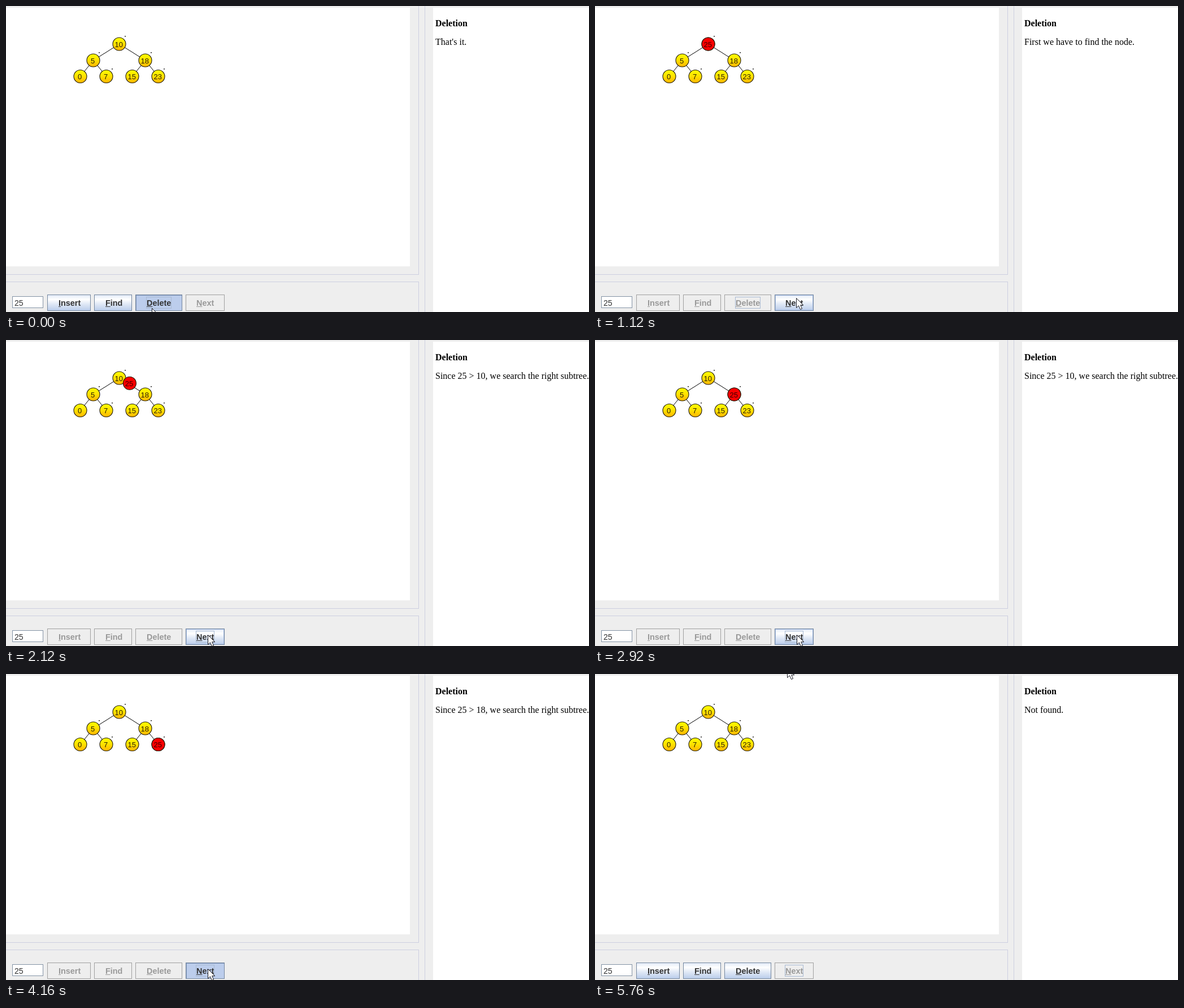
An HTML page with a canvas for the animation above (5.8 s loop, 1032 by 543 pixels).

```html
<!DOCTYPE html>
<html lang="en">
<head>
<meta charset="utf-8">
<title>Tree deletion</title>
<style>
html, body { margin: 0; width: 100%; height: 100%; overflow: hidden; background: #eee; }
canvas { display: block; }
</style>
</head>
<body>
<canvas id="stage" width="1032" height="543"></canvas>
<script>
const ctx = document.getElementById('stage').getContext('2d');
const LOOP = 5800, TICK = 40;
const SANS = '"Liberation Sans", Arial, sans-serif';
const SERIF = '"Liberation Serif", "Times New Roman", serif';

// Moments at which the user's clicks take effect
const START = 80, FIRST = 1920, SECOND = 3240, DONE = 4200;
const PRESS = 80, MOVE = 500;

const nodes = [
  { key: '10', x: 200.5, y: 67.5, dot: true },
  { key: '5', x: 154.5, y: 96.5, dot: true, up: 0 },
  { key: '18', x: 246.5, y: 96.5, dot: true, up: 0 },
  { key: '0', x: 131.5, y: 125, up: 1 },
  { key: '7', x: 177.5, y: 125, dot: true, up: 1 },
  { key: '15', x: 223.5, y: 125, up: 2 },
  { key: '23', x: 269.5, y: 125, dot: true, up: 2 }
];

const buttons = [
  { label: 'Insert', x: 73, w: 77, tx: 93 },
  { label: 'Find', x: 156, w: 67, tx: 176 },
  { label: 'Delete', x: 229, w: 83, tx: 249 },
  { label: 'Next', x: 318, w: 69, tx: 337 }
];

// Pointer keys: time, x, y
const pointer = [
  [0, 258, 536], [200, 258, 536], [960, 356, 518], [1240, 356, 518],
  [1440, 357, 523], [5240, 357, 523], [5760, 340, -11], [5800, 340, -11]
];

const clamp = v => Math.max(0, Math.min(1, v));
const lerp = (a, b, f) => a + (b - a) * f;

function rect(x, y, w, h, color) {
  ctx.fillStyle = color;
  ctx.fillRect(x, y, w, h);
}

function frame(x, y, w, h, color) {
  ctx.strokeStyle = color;
  ctx.lineWidth = 1;
  ctx.strokeRect(x + 0.5, y + 0.5, w - 1, h - 1);
}

function text(str, x, y, font, color = '#000', align = 'left') {
  ctx.font = font;
  ctx.fillStyle = color;
  ctx.textAlign = align;
  ctx.fillText(str, x, y);
}

function drawPanels() {
  const line = '#cccfe0';
  rect(0, 0, 1032, 543, '#eeeeee');
  rect(0, 3, 715, 459, '#fff');
  rect(756, 3, 276, 540, '#fff');
  rect(0, 476, 731, 1, line);
  rect(730, 0, 1, 477, line);
  rect(0, 489, 731, 1, line);
  rect(730, 489, 1, 54, line);
  rect(741, 0, 1, 543, line);
}

function drawNode(key, x, y, red) {
  if (red) {
    ctx.fillStyle = '#fa0000';
  } else {
    const g = ctx.createLinearGradient(0, y - 12, 0, y + 12);
    g.addColorStop(0, '#ffff00');
    g.addColorStop(0.45, '#ffe400');
    g.addColorStop(1, '#ffb400');
    ctx.fillStyle = g;
  }
  ctx.beginPath();
  ctx.arc(x, y, 11.5, 0, Math.PI * 2);
  ctx.fill();
  ctx.strokeStyle = '#1c1600';
  ctx.lineWidth = 1.1;
  ctx.stroke();
  text(key, x - 0.8, y + 5, '13px ' + SANS, red ? '#3a0000' : '#2a2200', 'center');
}

function drawTree() {
  ctx.strokeStyle = '#000';
  ctx.lineWidth = 1;
  ctx.beginPath();
  for (const n of nodes) {
    if (n.up === undefined) continue;
    const p = nodes[n.up];
    ctx.moveTo(p.x, p.y);
    ctx.lineTo(n.x, n.y);
  }
  ctx.stroke();
  for (const n of nodes) {
    drawNode(n.key, n.x, n.y, false);
    if (n.dot) rect(Math.floor(n.x) + 10, Math.floor(n.y) - 14, 2, 1.5, '#222');
  }
}

function drawSeeker(t) {
  if (t < START || t >= DONE) return;
  const second = t >= SECOND;
  const from = nodes[second ? 2 : 0], to = nodes[second ? 6 : 2];
  const f = clamp((t - (second ? SECOND : FIRST)) / MOVE);
  drawNode('25', lerp(from.x, to.x, f), lerp(from.y, to.y, f ** 1.25), true);
}

function drawButton(b, state, focus) {
  const y = 512, h = 29, off = state === 'off';
  if (off) {
    rect(b.x, y, b.w, h, '#eeeeee');
  } else if (state === 'down') {
    rect(b.x, y, b.w, h, '#bccdec');
  } else {
    const g = ctx.createLinearGradient(0, y, 0, y + h);
    g.addColorStop(0, '#dfe8f6');
    g.addColorStop(0.3, '#ffffff');
    g.addColorStop(0.6, '#dee7f5');
    g.addColorStop(1, '#b9cceb');
    rect(b.x, y, b.w, h, g);
  }
  if (state === 'hover') frame(b.x + 1, y + 1, b.w - 2, h - 2, '#a9bfe4');
  if (state === 'down') {
    rect(b.x + 1, y + 1, b.w - 2, 1, '#8499bd');
    rect(b.x + 1, y + 1, 1, h - 2, '#8499bd');
  }
  frame(b.x, y, b.w, h, off ? '#a0a0a0' : '#74879f');

  const font = 'bold 14.4px ' + SANS, color = off ? '#999' : '#333';
  text(b.label, b.tx, 532, font, color);
  const width = ctx.measureText(b.label).width;
  rect(b.tx, 533, ctx.measureText(b.label[0]).width, 1, color);
  if (focus) frame(b.tx - 1, 516, Math.round(width) + 2, 21, '#a9bad2');
}

function drawControls(t, mouse) {
  rect(11, 515, 55, 21, '#fff');
  frame(11, 515, 55, 21, '#8393a5');
  text('25', 15, 532, '14px ' + SANS, '#333');

  const busy = t >= START && t < DONE;
  const pressed = [FIRST, SECOND, DONE].some(c => t >= c - PRESS && t < c);
  const over = mouse.x >= 318 && mouse.x < 387 && mouse.y >= 512;
  const focus = t < FIRST - PRESS ? 2 : 3;
  buttons.forEach((b, i) => {
    let state = 'off';
    if (i === 3 && busy) state = pressed ? 'down' : over ? 'hover' : 'up';
    if (i < 3 && !busy) state = i === 2 && t < START ? 'down' : 'up';
    drawButton(b, state, i === focus);
  });
}

function message(t) {
  if (t < START) return "That's it.";
  if (t < FIRST) return 'First we have to find the node.';
  if (t >= DONE) return 'Not found.';
  return `Since 25 > ${t < SECOND ? 10 : 18}, we search the right subtree.`;
}

function mouseAt(t) {
  const i = pointer.findIndex((p, k) => k > 0 && t < p[0]);
  const [t0, x0, y0] = pointer[i - 1], [t1, x1, y1] = pointer[i];
  const f = (t - t0) / (t1 - t0), e = f * f * (3 - 2 * f);
  return { x: Math.round(lerp(x0, x1, e)), y: Math.round(lerp(y0, y1, e)) };
}

function drawPointer({ x, y }) {
  const shape = [[0, 0], [0, 17], [4, 13.3], [7, 20], [10, 18.7], [7.2, 12.3], [12.3, 12.3]];
  ctx.beginPath();
  for (const [dx, dy] of shape) ctx.lineTo(x + 0.5 + dx, y + 0.5 + dy);
  ctx.closePath();
  ctx.fillStyle = '#fff';
  ctx.fill();
  ctx.strokeStyle = '#1b1b24';
  ctx.lineWidth = 1;
  ctx.stroke();
}

function draw(t) {
  const mouse = mouseAt(t);
  drawPanels();
  drawTree();
  drawSeeker(t);
  text('Deletion', 760, 36, 'bold 16px ' + SERIF);
  text(message(t), 760, 69, '16px ' + SERIF);
  drawControls(t, mouse);
  drawPointer(mouse);
}

const begin = performance.now();
function loop() {
  const t = (performance.now() - begin) % LOOP;
  draw(Math.floor(t / TICK) * TICK);
  requestAnimationFrame(loop);
}
loop();
</script>
</body>
</html>
```
